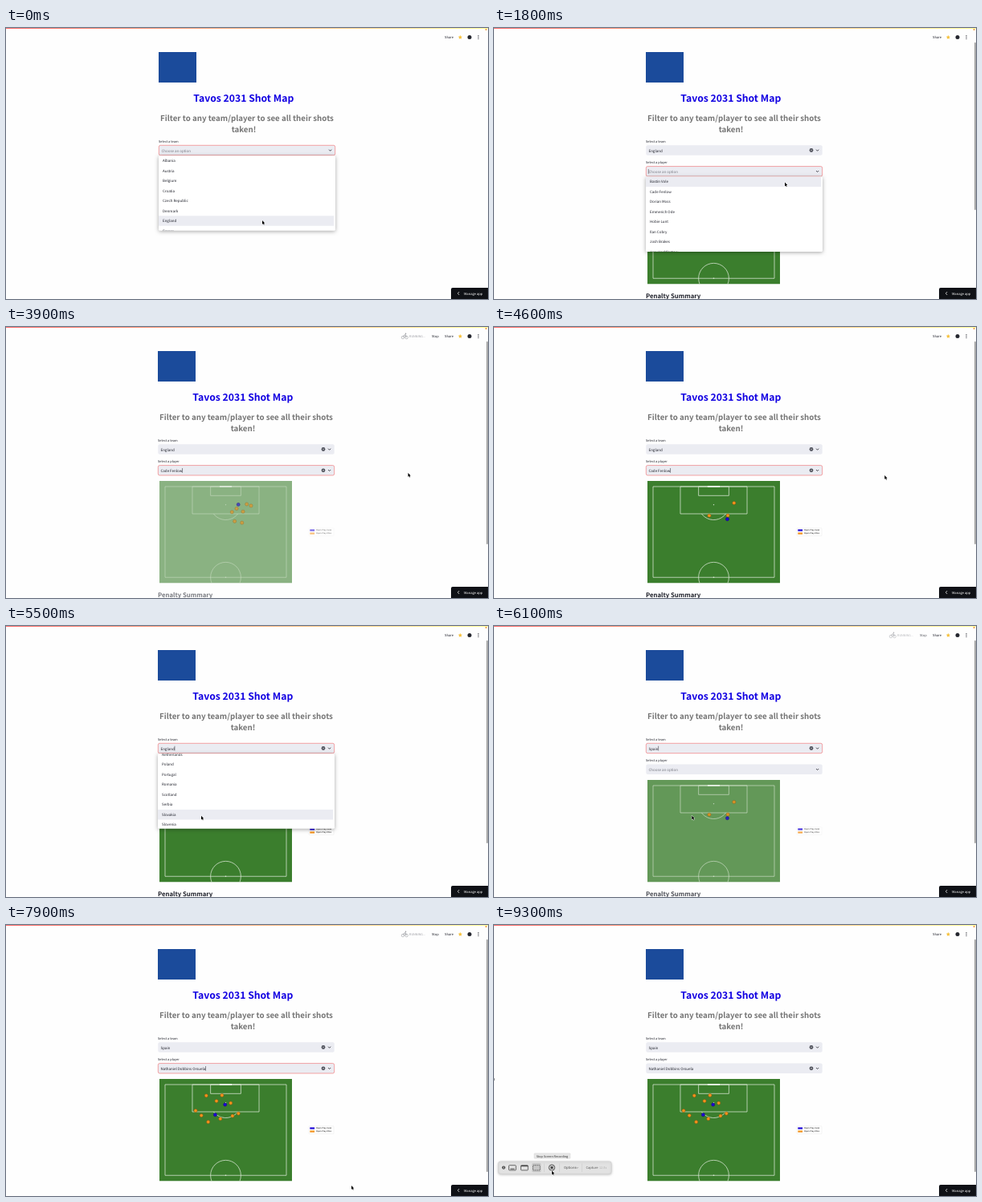
Recreate the animation shown at these times as an HTML page with a canvas. Size 600 by 338 pixels, loop 9400 ms.

```html
<!DOCTYPE html>
<html lang="en">
<head>
<meta charset="utf-8">
<title>Shot Map</title>
<style>
html, body { margin: 0; width: 100%; height: 100%; overflow: hidden; background: #fff; }
canvas { display: block; width: 600px; height: 338px; }
</style>
</head>
<body>
<canvas id="stage"></canvas>
<script>
const W = 600, H = 338, LOOP = 9400, STEP = 100;
const ROW = 12.5, MENU_H = 93.5, MENU_TOP = { team: 159.25, player: 185.5 };
const LOAD = 600, RUN_END = 800;
const canvas = document.getElementById('stage');
const ctx = canvas.getContext('2d');
const ratio = window.devicePixelRatio || 1;
canvas.width = W * ratio;
canvas.height = H * ratio;

const SANS = '"Noto Sans CJK SC", "Noto Sans CJK JP", "Noto Sans CJK", sans-serif';
const INK = '#1c1e28', FIELD = '#ebecf2', RED = '#f0696b', GRAY = '#484848';
const BLUE = '#1d05d8', ORANGE = '#f5921b';

const TEAMS = ['Albania', 'Austria', 'Belgium', 'Croatia', 'Czech Republic', 'Denmark',
  'England', 'France', 'Georgia', 'Germany', 'Hungary', 'Italy', 'Netherlands', 'Poland',
  'Portugal', 'Romania', 'Scotland', 'Serbia', 'Slovakia', 'Slovenia', 'Spain',
  'Switzerland', 'Turkey', 'Ukraine'];
const ENGLAND = ['Bastin Vole', 'Cade Fenlow', 'Dorian Moss', 'Emmerich Ode', 'Hobie Lunt',
  'Ilan Cobry', 'Josh Brakes', 'Jory Haddlestow'];
const SPAIN = ['Aitor Lemas Prado', 'Aldo Marrés Conde', 'Alonso Grau Rivero',
  'Dario Olvido Cantal', 'Efrén Campal Ramo', 'Fabián Ródez Calín', 'Fidelo Morras Peláiz',
  'Joel Ruz Campolarín Sevo', 'Lisandro Tamel Verraoda Oma', 'Mauro Belcorena Tasil',
  'Milio Serano Bazún', 'Milio Urgandazo Elarte', 'Nathaniel Dobbins Orsuela',
  'Orencio Valdas Prim', 'Pascual Teno Arriba', 'Rufino Castel Hoya', 'Urbano Lesma Gil'];

const clamp = v => Math.max(0, Math.min(1, v));
const smooth = u => u * u * (3 - 2 * u);

// Seeded shots around a centre, goals last and nearest to it.
function scatter(seed, misses, goals, cx, cy, spread) {
  const next = () => (seed = (seed * 16807) % 2147483647) / 2147483647;
  next();
  return Array.from({ length: misses + goals }, (_, i) => {
    const goal = i >= misses;
    const angle = i * 2.4 + next(), reach = goal ? 0.4 : Math.sqrt(next());
    return { x: cx + spread * reach * Math.cos(angle), y: cy + 22 * reach * Math.sin(angle), goal };
  });
}

// Each menu opens, scrolls the item up to the pointer and picks it.
const PICKS = [
  { field: 'team', open: 0, pick: 500, list: TEAMS, item: 6, y: 240.5, shots: scatter(71, 34, 5, 273, 228, 45) },
  { field: 'player', open: 1500, pick: 1950, list: ENGLAND, item: 0, y: 192, shots: scatter(8, 7, 1, 291, 230, 19) },
  { field: 'player', open: 3300, pick: 3600, list: ENGLAND, item: 1, y: 204.5, shots: scatter(12, 3, 1, 285, 232, 28) },
  { field: 'team', open: 4800, pick: 5900, list: TEAMS, item: 20, y: 238, shots: scatter(905, 34, 5, 273, 228, 45) },
  { field: 'player', open: 6350, pick: 7200, list: SPAIN, item: 12, y: 234, shots: scatter(33, 10, 2, 262, 228, 30) }
];

// Pointer rests: [arrival time, x, y].
const RESTS = [[0, 319, 240], [1750, 362, 192.5], [2500, 338.5, 181], [3500, 340, 203.5],
  [3900, 500.5, 182], [5200, 243, 236.7], [6700, 303.5, 233], [7800, 430, 325], [9200, 72, 306.5]];

function pointerAt(t) {
  const i = RESTS.findIndex(r => r[0] > t);
  if (i < 0) return RESTS[RESTS.length - 1].slice(1);
  const [from, ax, ay] = RESTS[i - 1], [to, bx, by] = RESTS[i];
  const glide = Math.min(700, to - from);
  const u = smooth(clamp((t - to + glide) / glide));
  return [ax + (bx - ax) * u, ay + (by - ay) * u];
}

function stateAt(t) {
  const state = { team: '', player: '', focus: '', shots: null, loaded: 0, run: null, menu: null };
  for (const p of PICKS) {
    if (t < p.open) break;
    state.focus = p.field;
    if (t < p.pick) { state.menu = p; break; }
    if (p.field === 'team') state.player = '';
    state[p.field] = p.list[p.item];
    if (t < p.pick + RUN_END + 120) state.run = t - p.pick;
    if (t >= p.pick + LOAD) { state.shots = p.shots; state.loaded++; }
  }
  if (t >= 8100) state.focus = '';
  return state;
}

function text(str, x, y, size = 5, color = INK, weight = 500, align = 'left') {
  ctx.font = `${weight} ${size * 0.895}px ${SANS}`;
  ctx.textAlign = align;
  ctx.fillStyle = color;
  ctx.fillText(str, x, y);
}

function paint(fill, stroke, width) {
  if (fill) { ctx.fillStyle = fill; ctx.fill(); }
  if (stroke) { ctx.strokeStyle = stroke; ctx.lineWidth = width; ctx.stroke(); }
}

function box(x, y, w, h, r, fill, stroke, width = 0.6) {
  ctx.beginPath();
  ctx.roundRect(x, y, w, h, r);
  paint(fill, stroke, width);
}

function disc(x, y, r, fill, stroke, width = 0.5) {
  ctx.beginPath();
  ctx.arc(x, y, r, 0, 7);
  paint(fill, stroke, width);
}

function line(points, color, width) {
  ctx.beginPath();
  points.forEach(([x, y]) => ctx.lineTo(x, y));
  paint(null, color, width);
}

const chevron = (x, y, r, color, width) => line([[x - r, y - r / 2], [x, y + r / 2], [x + r, y - r / 2]], color, width);

function clearButton(x, y, r, color) {
  const d = r * 0.38;
  disc(x, y, r, color);
  line([[x - d, y - d], [x + d, y + d]], '#fff', 0.5);
  line([[x - d, y + d], [x + d, y - d]], '#fff', 0.5);
}

function faded(alpha, draw) {
  ctx.save();
  ctx.globalAlpha = alpha;
  draw();
  ctx.restore();
}

function shadowed(alpha, blur, draw) {
  ctx.save();
  ctx.shadowColor = `rgba(0,0,0,${alpha})`;
  ctx.shadowBlur = blur * ratio;
  ctx.shadowOffsetY = ratio;
  draw();
  ctx.restore();
}

function drawSelect(x, y, value, focused, caret) {
  box(x + 0.3, y, 219.4, 12.4, 2, FIELD, focused ? RED : null);
  text(value || 'Choose an option', x + 3.5, y + 8.2, 5, value ? INK : '#74767f');
  if (focused && caret) {
    const cx = x + 3.3 + (value ? ctx.measureText(value).width + 0.5 : 0);
    line([[cx, y + 3.4], [cx, y + 9.2]], INK, 0.5);
  }
  if (value) clearButton(x + 206, y + 6.2, 2.4, '#4b4d57');
  chevron(x + 213.6, y + 6.2, 1.6, INK, 0.8);
}

function drawMenu({ field, open, pick, list, item, y }, x, t, pointerY) {
  const top = MENU_TOP[field];
  const target = Math.max(0, top + (item + 0.5) * ROW - y);
  const scroll = target * smooth(clamp((t - open - 100) / ((pick - open) * 0.7)));
  const hovered = Math.floor((pointerY - top + scroll) / ROW);
  shadowed(0.35, 5, () => box(x, top, 220, MENU_H, 1.5, '#fff'));
  ctx.save();
  ctx.beginPath();
  ctx.rect(x, top, 220, MENU_H);
  ctx.clip();
  list.forEach((name, i) => {
    const rowY = top + i * ROW - scroll;
    if (i === hovered) box(x, rowY, 218, ROW, 0, FIELD);
    text(name, x + 5, rowY + 7.9);
  });
  ctx.restore();
}

function drawPitch(shots) {
  const yard = 1.8875, cx = 273.5, top = 199, spot = top + 12 * yard, half = top + 60 * yard;
  const white = '#dce8d7', width = 0.75;
  const area = (w, h) => box(cx - w * yard / 2, top, w * yard, h * yard, 0, null, white, width);
  ctx.save();
  ctx.beginPath();
  ctx.rect(191, 192, 165, 127.6);
  ctx.clip();
  paint('#3b7e2d');
  area(80, 60);
  area(44, 18);
  area(20, 6);
  line([[cx - 4 * yard, top], [cx + 4 * yard, top]], '#fff', 1.3);
  disc(cx, spot, 0.7, white);
  disc(cx, half, 0.8, white);
  disc(cx, half, 10 * yard, null, white, width);
  const edge = Math.asin(0.6);
  ctx.beginPath();
  ctx.arc(cx, spot, 10 * yard, edge, Math.PI - edge);
  paint(null, white, width);
  shots.forEach(s => disc(s.x, s.y, 2.1, s.goal ? BLUE : ORANGE, s.goal ? '#12066e' : '#8a4f10', 0.45));
  ctx.restore();
}

function drawLegend() {
  box(377, 250.8, 31, 9.6, 0.5, '#fff', '#dedede', 0.3);
  [['Goal', BLUE], ['Miss', ORANGE]].forEach(([kind, color], i) => {
    const y = 253.5 + 4 * i;
    box(378.3, y - 1.1, 5.8, 2.2, 0, color);
    ctx.font = '2.5px "DejaVu Sans", sans-serif';
    ctx.textAlign = 'left';
    ctx.fillStyle = '#000';
    ctx.fillText('Open Play ' + kind, 386, y + 0.9);
  });
}

function drawRunning() {
  const gray = '#8d8e95';
  disc(494, 13, 1.8, null, gray);
  disc(498.6, 13, 1.8, null, gray);
  line([[494, 13], [495.3, 10.5], [497.8, 10.8], [496.4, 13]], gray, 0.5);
  line([[495.3, 10.5], [497, 8.8], [498.6, 13]], gray, 0.5);
  disc(497.6, 8.2, 0.7, gray);
  text('RUNNING...', 502, 13, 4.2, '#9c9da3');
  text('Stop', 530, 13, 4.5);
}

function drawHeader() {
  const strip = ctx.createLinearGradient(0, 0, W, 0);
  strip.addColorStop(0, '#ff4b4b');
  strip.addColorStop(1, '#fffd80');
  ctx.fillStyle = strip;
  ctx.fillRect(0, 0, W, 0.8);
  disc(597.6, 2, 1.1, '#f29b38');
  text('Share', 546, 13, 4.6);
  ctx.beginPath();
  for (let i = 0; i < 10; i++) {
    const a = i * Math.PI / 5 - Math.PI / 2, r = i % 2 ? 1.4 : 2.7;
    ctx.lineTo(565.4 + r * Math.cos(a), 11.6 + r * Math.sin(a));
  }
  paint('#f6c343');
  disc(577, 11.5, 2.5, '#25272f');
  for (let i = -1; i <= 1; i++) disc(588, 11.5 + 1.8 * i, 0.6, INK);
}

function drawRecorder(t) {
  box(-1, 191, 2, 3, 0.5, '#9a9a9a');
  shadowed(0.2, 3, () => box(5.3, 294.8, 141, 15.6, 3, '#e2e2e2', '#cbcbcb', 0.5));
  clearButton(12, 302.6, 2.1, GRAY);
  box(47.3, 297, 11.2, 11.2, 1.5, '#c6c6c6');
  for (let i = 0; i < 3; i++) {
    ctx.setLineDash(i === 2 ? [1, 0.7] : []);
    box(18.5 + 15 * i, 299.7, 8.8, 6.2, 0.8, null, GRAY, 0.8);
  }
  ctx.setLineDash([]);
  line([[20.3, 304.2], [25.5, 304.2]], GRAY, 1);
  line([[33.5, 300.6], [42.3, 300.6]], GRAY, 1.2);
  [62.5, 81.5, 109.5].forEach(x => line([[x, 297.5], [x, 308]], '#c6c6c6', 0.5));
  disc(72, 302.6, 3.6, null, GRAY, 1);
  box(70.4, 301, 3.2, 3.2, 0.4, GRAY);
  text('Options', 87, 304.3, 4.7, GRAY);
  chevron(103.6, 302.8, 1, GRAY, 0.5);
  text('Capture', 114.5, 304.3, 4.5, '#555');
  text('12.8s', 131, 304.3, 4.3, '#b0b0b0');
  if (t >= 9200) {
    box(50, 284.8, 45, 6.4, 0.8, '#e6e6e6', '#cfcfcf', 0.4);
    text('Stop Screen Recording', 72.5, 289.6, 4.2, '#333', 500, 'center');
  }
}

function drawPointer(x, y) {
  ctx.beginPath();
  [[0, 0], [0, 4.8], [1.1, 3.9], [1.9, 5.6], [2.7, 5.2], [1.9, 3.6], [3.3, 3.5]]
    .forEach(([dx, dy]) => ctx.lineTo(x + dx, y + dy));
  ctx.closePath();
  paint(null, '#fff', 0.9);
  paint('#000');
}

function draw(t) {
  ctx.setTransform(ratio, 0, 0, ratio, 0, 0);
  ctx.textRendering = 'geometricPrecision';
  ctx.fillStyle = '#fefefe';
  ctx.fillRect(0, 0, W, H);

  const { team, player, focus, shots, loaded, run, menu } = stateAt(t);
  const x = shots ? 189 : 190;
  const [px, py] = pointerAt(t);

  drawHeader();
  if (run !== null) faded(Math.min(clamp((run - 50) / 200), clamp(1 - (run - RUN_END) / 120)), drawRunning);

  box(x, 30, 47, 38, 0, '#1b4b9b');
  text('Tavos 2031 Shot Map', x + 105.8, 92, 13.65, '#1200e2', 700, 'center');
  text('Filter to any team/player to see all their shots', x + 110, 116, 10.85, '#757575', 600, 'center');
  text('taken!', x + 106, 129.6, 10.85, '#757575', 600, 'center');

  text('Select a team', x, 142.8, 4.4);
  drawSelect(x, 146.3, team, focus === 'team', team);

  if (shots) {
    const summary = loaded < 4;
    text('Select a player', x, 169.2, 4.4);
    drawSelect(x, 172.6, player, focus === 'player', true);
    const stale = run !== null && run < LOAD ? 1 - 0.62 * clamp((run - 100) / 300) : 1;
    faded(stale, () => {
      drawPitch(shots);
      drawLegend();
      if (summary) text('Penalty Summary', x, 337.2, 8.7, INK, 600);
    });
    const scrollbar = loaded === 1 ? 209 : summary ? 253 : 290;
    box(598.2, 18, 1.5, scrollbar, 0.7, '#8f8f8f');
  }

  if (menu) drawMenu(menu, x, t, py);

  box(554, 324, 50, 18, [2, 0, 0, 0], '#0f1116');
  line([[564.2, 329], [562.3, 331], [564.2, 333]], '#fff', 0.7);
  text('Manage app', 570, 332.8, 4.6, '#fff');

  if (t >= 8500) drawRecorder(t);
  drawPointer(px, py);
}

const start = performance.now();
function frame() {
  const t = (performance.now() - start) % LOOP;
  draw(Math.floor(t / STEP) * STEP);
  requestAnimationFrame(frame);
}
frame();
</script>
</body>
</html>
```
